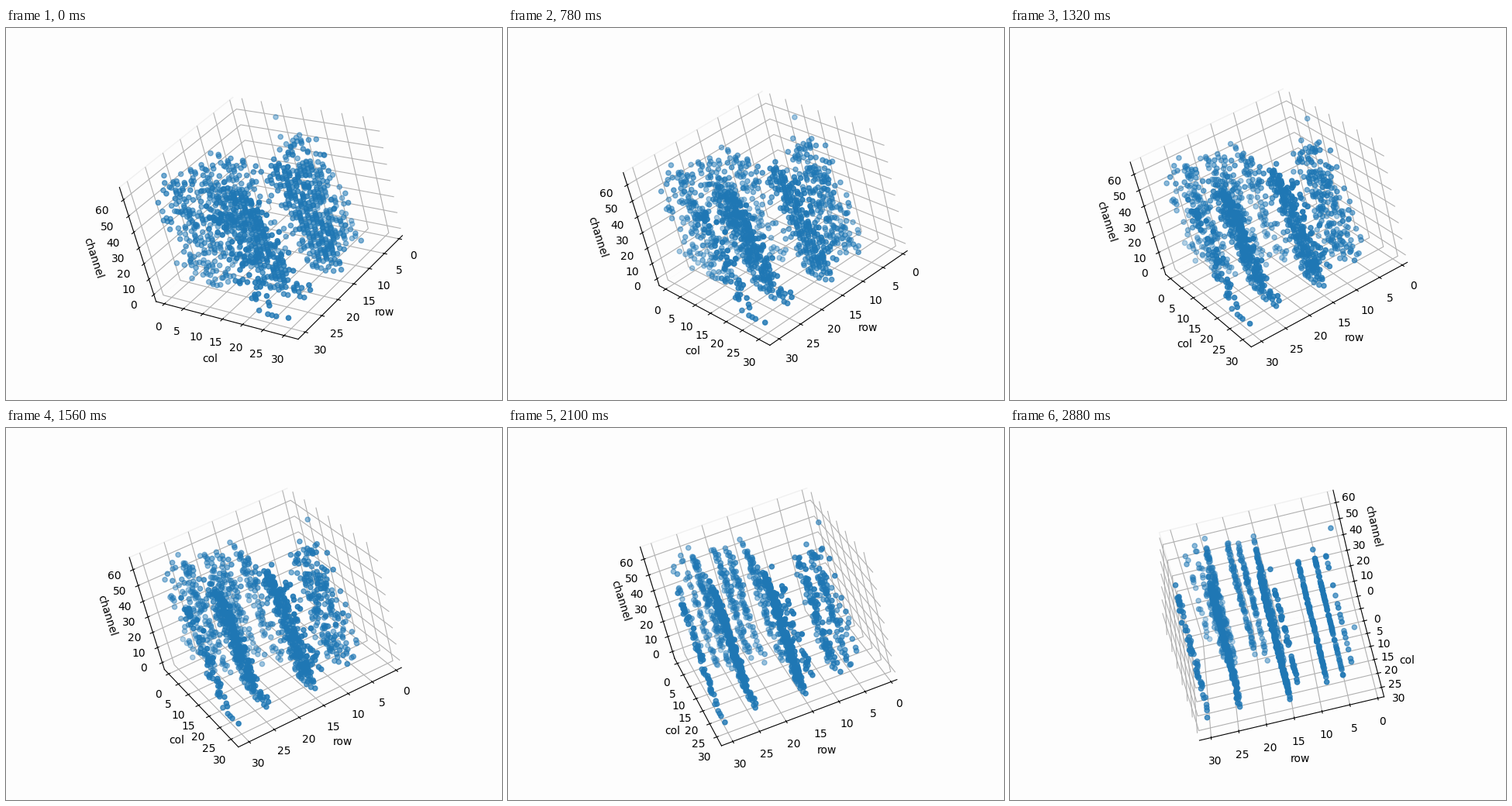
A matplotlib script that plays this animation: 640x480 px, repeating every 2.94 s.

```python
import numpy as np
import matplotlib.pyplot as plt
from matplotlib.animation import FuncAnimation

FRAMES, INTERVAL = 49, 60
PAPER = "#fdfdfd"

# Points per occupied row in the two sheets of the cloud
FRONT = {3: 18, 5: 85, 8: 110, 13: 40, 15: 260, 24: 270, 30: 60}
BACK = {15: 90, 18: 75, 20: 90, 24: 105, 26: 50, 28: 20}
STRAYS = [(1, 10, 63), (1, 16, 11), (28, 2, 53), (30, 27, 1), (30, 30, 2)]


def front_col(row):
    return 20 + 2.2 * np.cos((row - 15) / 3.5)


def back_col(row):
    return 2 + 0.55 * (28 - row)


def sheet(rng, counts, top_col, drift, spread):
    """Points on a grid whose column drifts as the channel falls."""
    row = np.repeat(list(counts), list(counts.values()))
    channel = np.rint(63 * rng.beta(1.2, 1.2, row.size))
    center = top_col(row) + drift * (1 - channel / 63)
    col = np.rint(rng.normal(center, spread))
    inside = (col >= 0) & (col <= 31)
    return np.column_stack([row, col, channel])[inside]


def padded(low, high):
    # 5 % data margin plus 1/48 of the widened range
    pad = (high - low) * (0.05 + 1.1 / 48)
    return low - pad, high + pad


rng = np.random.default_rng(7)
points = np.unique(np.vstack([
    sheet(rng, FRONT, front_col, 6.5, 2.8),
    sheet(rng, BACK, back_col, 5, 2.5),
    STRAYS,
]), axis=0)

fig = plt.figure(figsize=(6.4, 4.8), dpi=100, facecolor=PAPER)
ax = fig.add_subplot(projection="3d", facecolor=PAPER)
ax.scatter(*points.T)

ax.set(xlim=padded(1, 30), ylim=padded(0, 31), zlim=padded(0, 63),
       xlabel="row", ylabel="col", zlabel="channel")

for axis, edge in ((ax.xaxis, PAPER), (ax.yaxis, "#f0f0f0"), (ax.zaxis, PAPER)):
    axis.pane.set(alpha=1, facecolor=PAPER, edgecolor=edge)


def update(i):
    ax.view_init(elev=30, azim=45 + i, roll=15)
    return []


anim = FuncAnimation(fig, update, frames=FRAMES, interval=INTERVAL,
                     init_func=lambda: update(0), repeat=True, repeat_delay=0)
plt.show()
```
